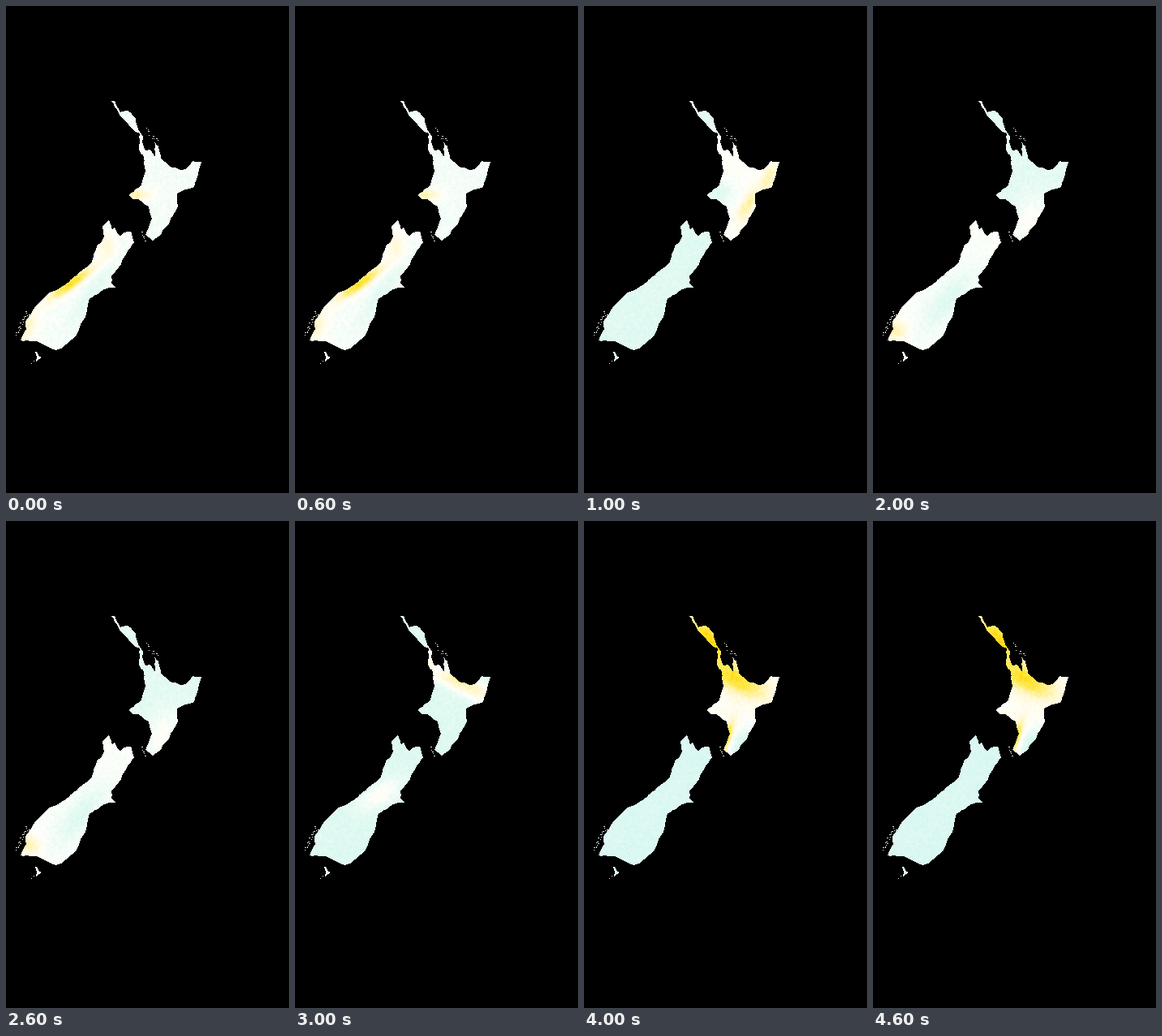
A matplotlib script that plays this animation: 349 px wide and 600 px high, repeating every 5000 ms.

```python
import numpy as np
import matplotlib.pyplot as plt
from matplotlib.animation import FuncAnimation
from matplotlib.colors import LinearSegmentedColormap
from matplotlib.path import Path

W, H, DPI = 349, 600, 100
X, Y = np.meshgrid(np.arange(W) + 0.5, np.arange(H) + 0.5)
rng = np.random.default_rng(12)

NORTHLAND = [
    (130, 117), (134, 117), (141, 131), (150, 129), (160, 138), (163, 152),
    (169, 161), (168, 168), (172, 178), (167, 183), (164, 177), (165, 157),
    (157, 153), (146, 141),
]
NORTH = [
    (168, 178), (178, 177), (184, 186), (183, 167), (189, 178), (191, 188),
    (205, 199), (218, 202), (226, 197), (230, 191), (241, 192), (237, 208),
    (232, 223), (221, 226), (211, 231), (212, 247), (203, 262), (200, 270),
    (188, 284), (181, 289), (172, 282), (180, 262), (176, 247), (163, 238),
    (157, 238), (151, 233), (167, 221), (172, 203),
]
SOUTH = [
    (127, 263), (131, 276), (134, 273), (141, 284), (145, 279), (154, 278),
    (158, 291), (146, 309), (142, 318), (130, 333), (130, 342), (135, 347),
    (124, 348), (103, 360), (99, 380), (92, 392), (85, 408), (70, 421),
    (61, 424), (46, 417), (38, 413), (18, 412), (25, 398), (24, 389),
    (37, 369), (52, 354), (67, 347), (104, 318), (111, 299), (121, 284),
    (119, 272),
]
STEWART = [(36, 426), (39, 427), (40, 431), (44, 433), (37, 438), (38, 432)]

# Islet groups: start, end, spread, count
ISLETS = [
    ((12, 404), (26, 377), 2.5, 22), ((170, 152), (188, 170), 4, 10),
    ((168, 279), (170, 288), 1.5, 5), ((31, 440), (34, 437), 0.3, 2),
]


def fill(points, jitter=0.8):
    """Fill an outline whose edges are broken into short ragged steps."""
    coast = []
    for p, q in zip(points, points[1:] + points[:1]):
        p, q = np.array(p, float), np.array(q, float)
        n = max(1, int(np.hypot(*(q - p)) // 4))
        coast.append(p)
        for k in range(1, n):
            coast.append(p + (q - p) * k / n + rng.uniform(-jitter, jitter, 2))
    grid = np.c_[X.ravel(), Y.ravel()]
    inside = Path(coast + coast[:1]).contains_points(grid)
    return inside.reshape(H, W)


land = fill(NORTHLAND) | fill(NORTH) | fill(SOUTH) | fill(STEWART)
for start, end, spread, count in ISLETS:
    for t in np.linspace(0, 1, count):
        spot = np.array(start) * (1 - t) + np.array(end) * t
        ix, iy = (spot + rng.uniform(-spread, spread, 2)).round().astype(int)
        land[iy, ix:ix + rng.integers(1, 3)] = True

# Fine weather texture shared by all scenes
grain = rng.normal(size=(H, W))
for axis in (0, 1):
    grain = (np.roll(grain, 1, axis) + grain + np.roll(grain, -1, axis)) / 3
grain *= 0.025 / grain.std()

# Base level for north and south, then blobs: x, y, length, width, tilt, height
SCENES = [
    (0.26, 0.28, [
        (80, 342, 25, 5, -36, 0.52), (125, 295, 8, 12, 0, 0.18),
        (160, 232, 13, 6, 0, 0.30), (27, 396, 7, 13, 20, 0.22),
        (106, 355, 34, 8, -55, -0.14)]),
    (0.32, 0.12, [
        (202, 245, 16, 6, -62, 0.27), (228, 212, 13, 6, -65, 0.25),
        (165, 231, 14, 10, 0, -0.20), (152, 140, 16, 7, 45, -0.18)]),
    (0.15, 0.30, [
        (192, 264, 24, 14, -60, 0.18), (28, 400, 10, 8, 0, 0.27),
        (92, 362, 32, 12, -50, -0.19)]),
    (0.12, 0.11, [
        (200, 198, 24, 8, 25, 0.44), (228, 212, 10, 10, 0, 0.18),
        (168, 170, 5, 12, 0, 0.20), (105, 337, 22, 10, -30, 0.22)]),
    (0.35, 0.08, [
        (155, 146, 26, 10, 52, 0.50), (190, 197, 28, 11, 26, 0.42),
        (177, 266, 4, 15, 18, 0.48), (198, 276, 11, 15, 25, -0.32)]),
]

RAMP = LinearSegmentedColormap.from_list("ramp", [
    (0.00, "#d2f5f5"), (0.12, "#e0faf1"), (0.32, "#fffffb"),
    (0.50, "#fff8cf"), (0.65, "#ffee78"), (0.82, "#ffe01e"),
    (1.00, "#ffb000")])


def blob(x, y, length, width, tilt, height):
    a = np.radians(tilt)
    dx, dy = X - x, Y - y
    u = (dx * np.cos(a) + dy * np.sin(a)) / length
    v = (dy * np.cos(a) - dx * np.sin(a)) / width
    return height * np.exp(-(u * u + v * v) / 2)


def render(north, south, blobs):
    is_south = (X < 160) & (Y > 258)
    level = np.where(is_south, south, north) + grain
    level += sum(blob(*b) for b in blobs)
    rgb = RAMP(np.clip(level, 0, 1))[..., :3]
    return rgb * land[..., None]


maps = [render(*s) for s in SCENES]

fig = plt.figure(figsize=(W / DPI, H / DPI), dpi=DPI, facecolor="black")
ax = fig.add_axes([0, 0, 1, 1])
ax.axis("off")
picture = ax.imshow(maps[0], interpolation="nearest", aspect="auto")


def update(i):
    picture.set_data(maps[i])
    return [picture]


anim = FuncAnimation(fig, update, frames=len(maps), interval=1000,
                     repeat=True, repeat_delay=0)
plt.show()
```
